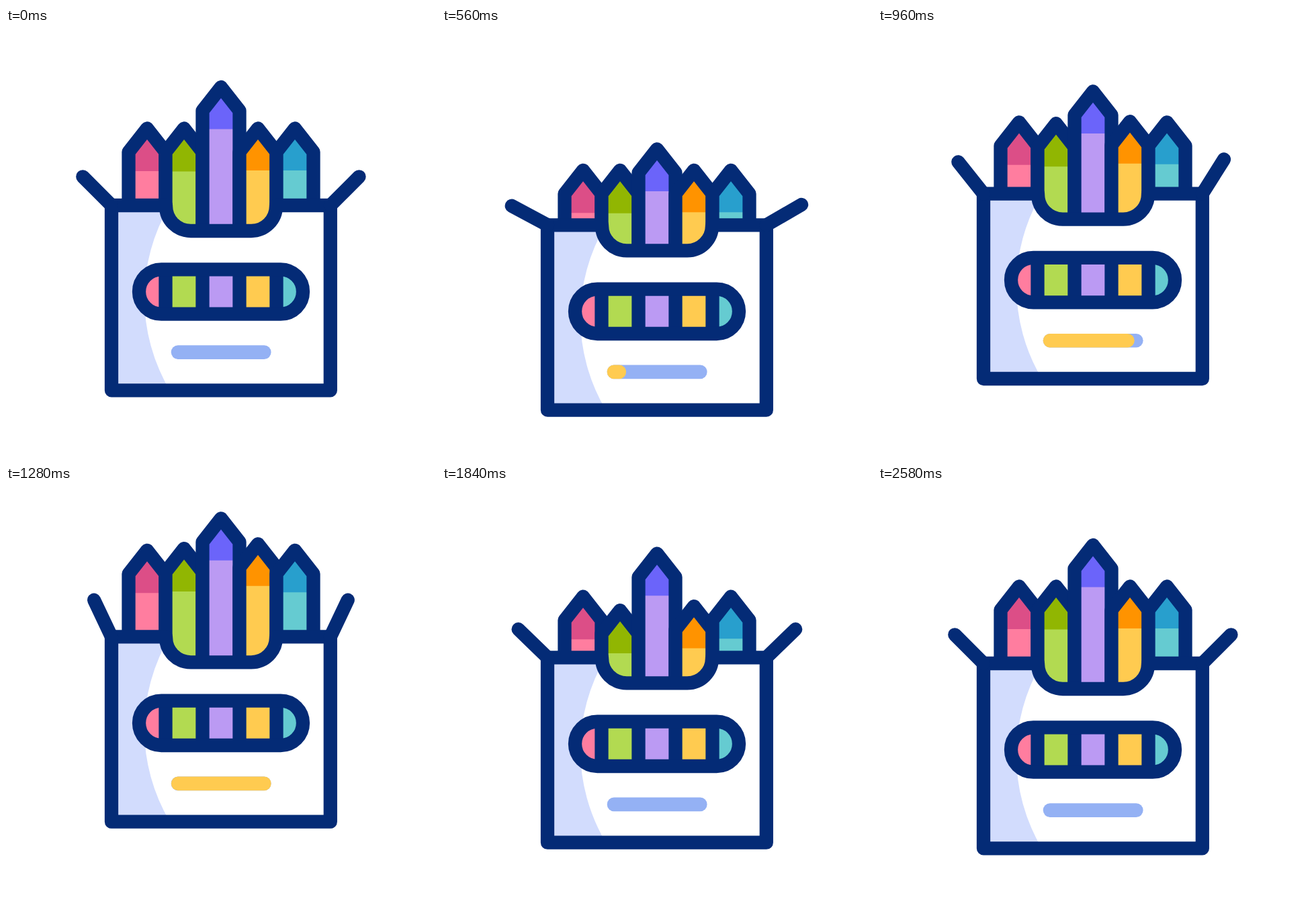
These frames come from a looping animation (640 by 640 pixels, 2900 ms). An HTML page:

```html
<!DOCTYPE html>
<html lang="en">
<head>
<meta charset="utf-8">
<title>Crayon box</title>
<style>
html, body { margin: 0; width: 100%; height: 100%; overflow: hidden; background: #fff; }
svg { display: block; width: 100vw; height: 100vh; }
.line { fill: none; stroke: #042b76; stroke-width: 20.3; stroke-linecap: round; stroke-linejoin: round; }
.bar { fill: none; stroke-width: 20.6; stroke-linecap: round; }
</style>
</head>
<body>
<svg viewBox="0 0 640 640">
  <g id="box">
    <g id="pencils"></g>
    <path id="face" fill="#fff"/>
    <path d="M157 264H243.6A270 270 0 0 0 243.6 539H157Z" fill="#d2dcfd"/>
    <path id="edge" class="line"/>
    <path id="flapL" class="line"/>
    <path id="flapR" class="line"/>
    <clipPath id="pill"><rect x="198" y="359.3" width="244" height="66.4" rx="33.2"/></clipPath>
    <g id="slots" clip-path="url(#pill)"></g>
    <rect class="line" x="198" y="359.3" width="244" height="66.4" rx="33.2"/>
    <path class="bar" d="M256 482.6H384.3" stroke="#94b1f4"/>
    <path id="fill" class="bar" stroke="#ffcb50"/>
  </g>
</svg>
<script>
const LOOP = 2900, STEP = 20;
const $ = id => document.getElementById(id);

function add(parent, tag, attrs) {
  const el = document.createElementNS('http://www.w3.org/2000/svg', tag);
  for (const k in attrs) el.setAttribute(k, attrs[k]);
  return parent.appendChild(el);
}

const ease = x => (1 - Math.cos(Math.PI * x)) / 2;
const clamp = x => Math.min(1, Math.max(0, x));

// Eased value of a list of [time, value] keys.
function track(keys, t) {
  if (t <= keys[0][0]) return keys[0][1];
  for (let i = 1; i < keys.length; i++) {
    const [t0, v0] = keys[i - 1], [t1, v1] = keys[i];
    if (t <= t1) return v0 + (v1 - v0) * ease((t - t0) / (t1 - t0));
  }
  return keys[keys.length - 1][1];
}

const bounce = [[200, 0], [415, 34.3], [1280, -39.7], [1540, 20.5], [2000, -19.5], [2220, 1], [2360, 0]];
const flapEnd = [[1280, 64.6], [1480, 22], [1980, 49], [2260, 39], [2560, 45]];
const flapLeft = [[200, 45], [460, 27.5], [490, 27.5], ...flapEnd];
const flapRight = [[200, 45], [420, 27.5], [436, 27.5], [1165, 64.6], ...flapEnd];

const outer = [[200, 0], [480, 33], [560, 33], [1340, -14.7], [1650, 38.5], [2120, -3], [2200, -3], [2580, 0]];
const pencils = [
  { x: 210, top: 149.5, cut: 63.5, light: '#ff7d9f', dark: '#dc4e87', keys: outer },
  { x: 265, top: 149.5, cut: 64, light: '#b2da51', dark: '#91b602',
    keys: [[200, 0], [480, 33], [645, 33], [1310, -17], [1860, 44.5], [2260, -3], [2580, 0]] },
  { x: 320, top: 88, cut: 62.5, light: '#bb9af3', dark: '#6b64fa',
    keys: [[200, 0], [480, 64], [500, 64], [1290, 0], [1600, 76], [1980, -2], [2360, 0]] },
  { x: 375, top: 149.5, cut: 62.5, light: '#ffcb50', dark: '#ff9300',
    keys: [[200, 0], [480, 33], [640, 33], [1320, -24], [1860, 38.5], [2260, -3], [2580, 0]] },
  { x: 430, top: 149.5, cut: 62.5, light: '#65cbd1', dark: '#289fcd', keys: outer }
];

for (const p of pencils) {
  p.el = add($('pencils'), 'g', {});
  const shape = `M${p.x - 27.5} 230V35L${p.x} 0L${p.x + 27.5} 35V230`;
  add(p.el, 'path', { d: shape, fill: p.light });
  add(p.el, 'path', { d: `M${p.x - 27.5} ${p.cut}V35L${p.x} 0L${p.x + 27.5} 35V${p.cut}Z`, fill: p.dark });
  add(p.el, 'path', { d: shape, class: 'line' });
  add($('slots'), 'rect', { x: p.x - 27.5, y: 359, width: 55, height: 67, fill: p.light });
}
for (let x = 237.5; x < 410; x += 55) add($('slots'), 'path', { d: `M${x} 359V426`, class: 'line' });

const outline = 'M157 264H238V265A37 37 0 0 0 275 302H365A37 37 0 0 0 402 265V264H482.8V539.4H157Z';
$('face').setAttribute('d', outline);
$('edge').setAttribute('d', outline);

function flap(el, x, side, deg) {
  const a = deg * Math.PI / 180;
  el.setAttribute('d', `M${x} 264L${x + side * 60.4 * Math.cos(a)} ${264 - 60.4 * Math.sin(a)}`);
}

function draw(t) {
  $('box').setAttribute('transform', `translate(0 ${track(bounce, t)})`);
  for (const p of pencils) p.el.setAttribute('transform', `translate(0 ${p.top + track(p.keys, t)})`);
  flap($('flapL'), 157, -1, track(flapLeft, t));
  flap($('flapR'), 482.8, 1, track(flapRight, t));

  const from = ease(clamp((t - 1260) / 580) ** 1.12);
  const to = ease(clamp((t - 461) / 628));
  $('fill').setAttribute('d', to > from ? `M${256 + 128.3 * from} 482.6H${256 + 128.3 * to}` : '');
}

const start = performance.now();
function tick(now) {
  const t = Math.max(0, now - start) % LOOP;
  draw(Math.floor(t / STEP) * STEP);
  requestAnimationFrame(tick);
}
draw(0);
requestAnimationFrame(tick);
</script>
</body>
</html>
```
